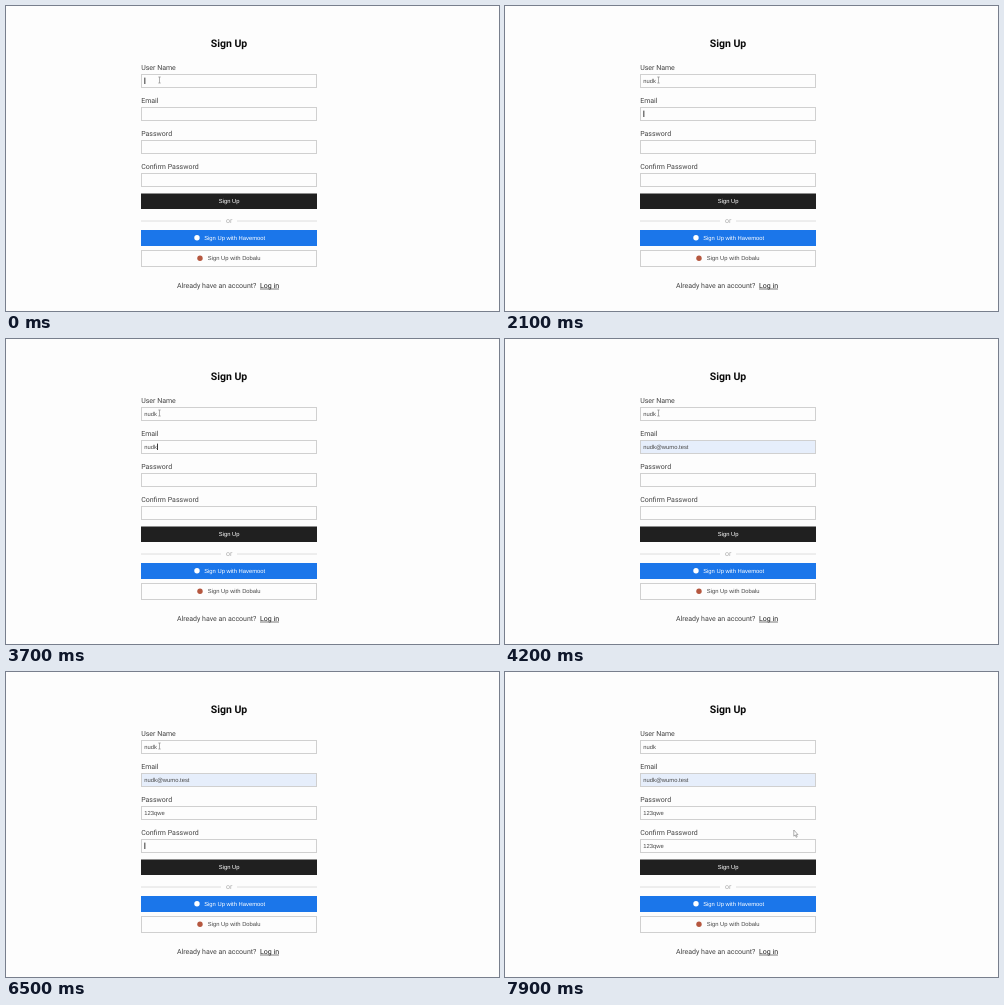
An HTML page for the animation above (8000 ms loop, 493x305 px).

```html
<!DOCTYPE html>
<html lang="en">
<head>
<meta charset="utf-8">
<title>Sign Up</title>
<style>
  html, body { margin: 0; width: 100%; height: 100%; overflow: hidden; background: #fdfdfd; }
  svg { display: block; width: 100vw; height: 100vh; text-rendering: geometricPrecision; }
  text { font: 7px Roboto, sans-serif; fill: #444; }
  .title { font-size: 10.5px; font-weight: 700; fill: #0c0c0c; }
  .small { font: 5.833px "Liberation Sans", Arial, sans-serif; fill: #484848; white-space: pre; }
  .light { fill: #fff; }
  .box { fill: #fdfdfd; stroke: #d0d0d0; }
</style>
</head>
<body>
<svg viewBox="0 0 493 305" preserveAspectRatio="none">
  <rect width="493" height="305" fill="#fdfdfd"/>
  <text class="title" x="223" y="41.4" text-anchor="middle">Sign Up</text>
  <g id="fields"></g>

  <rect x="135" y="187.5" width="176" height="15.5" fill="#202020"/>
  <text class="small light" x="223.2" y="197.4" text-anchor="middle">Sign Up</text>

  <path d="M135 215h80M231 215h80" stroke="#dedede"/>
  <text x="223.2" y="216.8" text-anchor="middle" style="fill:#aaa">or</text>

  <rect x="135" y="224" width="176" height="16" fill="#1b76ea"/>
  <circle cx="191" cy="231.7" r="2.7" fill="#fff"/>
  <text class="small light" x="198.2" y="233.8">Sign Up with Havemoot</text>

  <rect class="box" x="135.5" y="244.5" width="175" height="16"/>
  <circle cx="194" cy="252.2" r="2.7" fill="#b5573f"/>
  <text class="small" x="201.8" y="254.3">Sign Up with Dobalu</text>

  <text x="171" y="281.8">Already have an account?</text>
  <text x="254" y="281.8" style="fill:#222">Log in</text>
  <path d="M254 283h19" stroke="#444" stroke-width=".7"/>

  <rect id="caret" width=".9" height="6.4" fill="#222"/>
  <path id="beam" d="M-1.2-3h2.4M0-3v6M-1.2 3h2.4" fill="none" stroke="#8c8c8c" stroke-width=".7"/>
  <path id="arrow" d="M0 0v6.2l1.4-1.2 1 2.3 1-.4-1-2.2h1.8z" fill="#fff" stroke="#777" stroke-width=".6"/>
</svg>
<script>
const LOOP = 8000, STEP = 100, TEXT_X = 138.3;
const $ = id => document.getElementById(id);

const fields = ['User Name', 'Email', 'Password', 'Confirm Password'].map((label, i) => {
  const y = 68 + 33 * i;
  const group = document.createElementNS('http://www.w3.org/2000/svg', 'g');
  group.innerHTML = `<text x="135.2" y="${y - 3.7}">${label}</text>
    <rect class="box" x="135.5" y="${y + .5}" width="175" height="13"/>
    <text class="small" x="${TEXT_X}" y="${y + 8.8}"></text>`;
  $('fields').append(group);
  return { y, box: group.querySelector('rect'), text: group.querySelector('.small') };
});

const user = 'nudk', email = user + '@wumo.test', password = '123qwe';
const AUTOFILL = 4200;

// Each entry is [time, field index, field content].
const typing = (field, word, times) => times.map((time, i) => [time, field, word.slice(0, i)]);
const events = [
  ...typing(0, user, [-300, 800, 1300, 1500, 1800]),
  ...typing(1, user, [2100, 2400, 2700, 2800, 3700]),
  [AUTOFILL, 1, email],
  [4500, 1, email],
  ...typing(2, password, [5100, 5500, 5600, 5800, 5900, 6100, 6200]),
  ...typing(3, password, [6400, 6600, 6800, 7000, 7100, 7200, 7300])
];

function drawFields(t) {
  const content = ['', '', '', ''];
  let last;
  for (const event of events) {
    if (event[0] > t) break;
    content[event[1]] = event[2];
    last = event;
  }
  fields.forEach((field, i) => {
    if (field.text.textContent !== content[i]) field.text.textContent = content[i];
  });
  fields[1].box.style.fill = t >= AUTOFILL ? '#e6eefb' : '';

  const [time, index, value] = last;
  const field = fields[index];
  const width = value ? field.text.getComputedTextLength() : 0;
  $('caret').setAttribute('x', TEXT_X + width + .1);
  $('caret').setAttribute('y', field.y + 3.6);
  $('caret').style.display = t - time <= 500 && time !== AUTOFILL ? '' : 'none';
}

function drawPointer(t) {
  const p = Math.min(1, Math.max(0, (t - 7400) / 500));
  const eased = p * p * (3 - 2 * p);
  const x = 153.5 + 135.3 * eased, y = 74 + 84 * eased;
  const overField = fields.some(f => y >= f.y && y <= f.y + 14);
  for (const [id, shown] of [['beam', overField], ['arrow', !overField]]) {
    $(id).style.display = shown ? '' : 'none';
    $(id).setAttribute('transform', `translate(${x} ${y})`);
  }
}

const start = performance.now();
function frame() {
  const elapsed = (performance.now() - start) % LOOP;
  const t = Math.floor(elapsed / STEP) * STEP;
  drawFields(t);
  drawPointer(t);
  requestAnimationFrame(frame);
}
frame();
</script>
</body>
</html>
```
